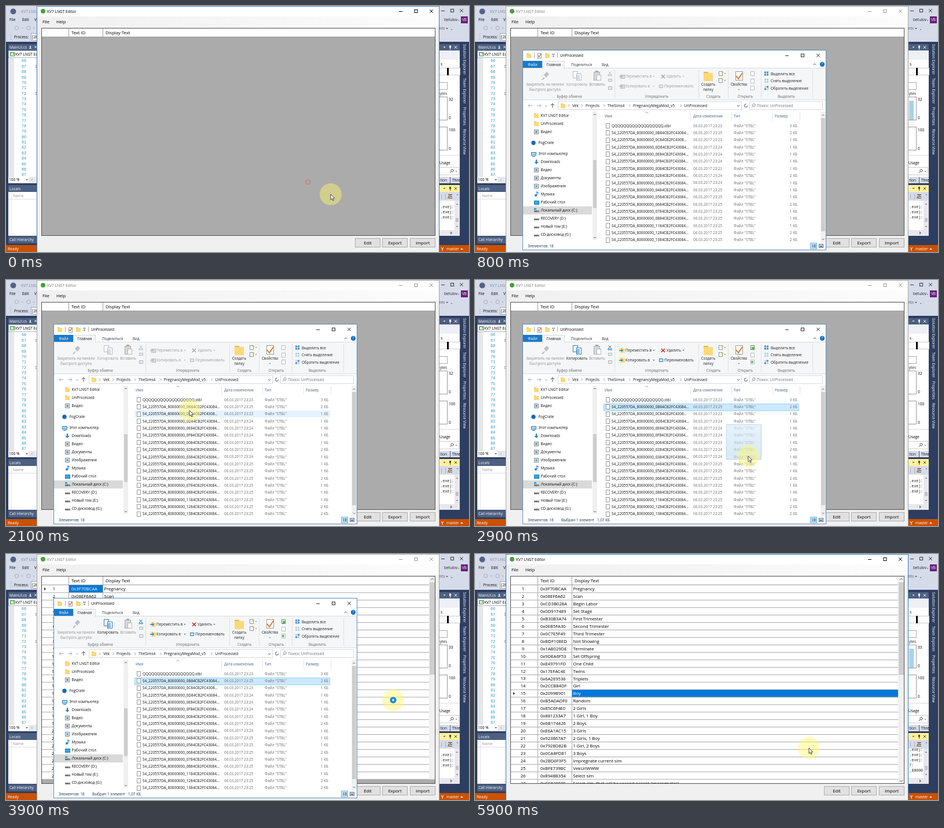
Recreate the animation shown at these times as an HTML page with a canvas. Size 800x426 px, loop 6000 ms.

```html
<!DOCTYPE html>
<html lang="ru">
<head>
<meta charset="utf-8">
<title>Table editor</title>
<style>
html, body { margin: 0; width: 100%; height: 100%; overflow: hidden; }
canvas { display: block; width: 100vw; height: 100vh; }
</style>
</head>
<body>
<canvas id="stage" width="800" height="426"></canvas>
<script>
const ctx = document.getElementById('stage').getContext('2d');
const LOOP = 6000, STEP = 100;
const APP = 'KV7 LNGT Editor';
const SANS = '"Open Sans", "Noto Sans", sans-serif', MONO = '"Liberation Mono", monospace';
const NAVY = '#2d3e60', PANEL = '#4d6082', PALE = '#d6dbe9', BLUE = '#0078d7', GRAY = '#6d6d6d';

// Moments of hard changes, ms
const OPEN = 700, SELECT = 2600, DRAG = 2700, DROP = 3400, LOADED = 3600, READY = 4200, FRONT = 4300, PICK = 4500;

// time, x, y
const PATH = [
  [0, 561, 326], [300, 520, 370], [500, 400, 450], [800, 300, 450], [900, 302, 400],
  [1400, 335, 231], [1700, 321, 230], [1900, 317, 226], [2100, 317, 226], [2400, 312, 221],
  [2600, 312, 222], [2900, 472, 305], [3300, 669, 253], [4300, 669, 253], [4500, 669, 245],
  [4700, 669, 245], [5300, 509, 310], [5900, 577, 336], [6000, 561, 326]
];
// start, end, x, y, radius
const RINGS = [[0, 100, 522, 305, 4], [2500, 2900, 312, 222, 8], [4300, 4900, 669, 253, 10], [4500, 4900, 669, 245, 10]];

const ENTRIES = `3F70BCAA Pregnancy|08EF6A62 Scan|CD3B028A Begin Labor|0D917489 Set Stage|B30B3A74 First Trimester
0EB5FA30 Second Trimester|0C7E5F49 Third Trimester|BDF108ED Not Showing|1AB029DE Terminate|9DEA6F53 Set Offspring
E49791FD One Child|17EFAC4E Twins|6A2E9536 Triplets|2CCB84DF Girl|2099B901 Boy|B5ADADF0 Random|85C6F4E0 2 Girls
881233A7 1 Girl, 1 Boy|6B174426 2 Boys|E6A1AC15 3 Girls|923867A7 2 Girls, 1 Boy|7928D82B 1 Girl, 2 Boys
0CA8FD81 3 Boys|2BD0F3F5 Impregnate current sim|BFE739BC VekUrlWWW|8948B354 Select sim
CC620F8F Select sim, that will be second parent (impregnator)`.split(/[|\n]/);
const FILES = ' 0B 0C 0D 0E 0F 00 02 03 04 05 06 07 08 11 12 13'.split(' ');
const MINUTES = '35344434455555555', SIZES = '32111112111211122';

function rect(x, y, w, h, color) { ctx.fillStyle = color; ctx.fillRect(x, y, w, h); }
function box(x, y, w, h, fill, stroke) {
  if (fill) rect(x, y, w, h, fill);
  ctx.strokeStyle = stroke; ctx.lineWidth = 1;
  ctx.strokeRect(x + .5, y + .5, w - 1, h - 1);
}
function path(points, color, width = 1) {
  ctx.beginPath();
  points.forEach((p, i) => i ? ctx.lineTo(...p) : ctx.moveTo(...p));
  if (width) { ctx.strokeStyle = color; ctx.lineWidth = width; ctx.stroke(); }
  else { ctx.closePath(); ctx.fillStyle = color; ctx.fill(); }
}
function disc(x, y, r, fill, stroke, width = 1) {
  ctx.beginPath(); ctx.arc(x, y, r, 0, 7);
  if (fill) { ctx.fillStyle = fill; ctx.fill(); }
  if (stroke) { ctx.strokeStyle = stroke; ctx.lineWidth = width; ctx.stroke(); }
}
// y is the middle of the capitals
function text(s, x, y, size = 6.5, color = '#000', align = 'left', family = SANS) {
  ctx.font = `${size}px ${family}`;
  ctx.fillStyle = color; ctx.textAlign = align;
  ctx.fillText(s, x, y + size * .36);
}
function clipped(x, y, w, h, paint) {
  ctx.save(); ctx.beginPath(); ctx.rect(x, y, w, h); ctx.clip(); paint(); ctx.restore();
}
const caret = (x, y, color = '#444', r = 2, up = 1) => path([[x - r, y - up * r / 2], [x + r, y - up * r / 2], [x, y + up * r / 2]], color, 0);
const chevron = (x, y, color, r = 2, up = 1) => path([[x - r, y + up * r / 2], [x, y - up * r / 2], [x + r, y + up * r / 2]], color);
const arrowRight = (x, y, color = '#777') => path([[x - 1, y - 2], [x + 1, y], [x - 1, y + 2]], color, .8);
function cross(x, y, r, color, width = 1) {
  path([[x - r, y - r], [x + r, y + r]], color, width);
  path([[x - r, y + r], [x + r, y - r]], color, width);
}
function windowButtons(x, y, gap, color) {
  path([[x - 3, y + .5], [x + 3, y + .5]], color);
  box(x + gap - 3, y - 3, 6, 6, null, color);
  cross(x + 2 * gap, y, 2.8, color);
}
function lens(x, y, color = '#555') {
  disc(x + 1, y - 1, 2.2, null, color);
  path([[x - .5, y + .5], [x - 3, y + 3]], color);
}
function folder(x, y, s = 1) {
  rect(x - 4 * s, y - 4 * s, 4 * s, 2 * s, '#e8b84a');
  rect(x - 4 * s, y - 3 * s, 8 * s, 7 * s, '#fbd977');
}
function page(x, y, w = 7, h = 9, stroke = '#9a9a9a') { box(Math.round(x - w / 2), Math.round(y - h / 2), w, h, '#fff', stroke); }
function panelButtons(y, color) {
  caret(757.5, y, color);
  rect(766, y - 3, 3, 4, color); rect(767, y + 1, 1, 3, color);
  cross(777, y, 2.2, color);
}

function ideLeft() {
  rect(0, 0, 54, 62, PALE);
  disc(12.5, 9.5, 5, '#56618a');
  text(APP, 26, 10, 6.6, '#8088a0');
  text('File', 6, 24); text('Edit', 28, 24); text('View', 49, 24);
  disc(18.5, 38, 3.2, null, '#a5adbf'); disc(39, 38, 3.2, null, '#a5adbf');
  caret(28, 38.5, '#999', 1.5); caret(48, 38.5, '#999', 1.5);
  for (let y = 48; y < 60; y += 3) rect(8, y, 1, 1, '#8993ab');
  text('Process:', 14, 53.5);
  box(43, 47, 30, 13, '#fff', '#9ba7bf'); text('[28', 45, 53.5);

  rect(4, 66, 50, 11, PANEL);
  text('MainUI.cs', 6, 72, 6.6, '#fff');
  rect(41, 69, 2, 4, PALE); rect(40, 73, 4, 1, PALE); cross(51, 71, 2, PALE);
  box(4, 77, 60, 13, '#fff', '#a9b3c7');
  box(7, 80, 8, 7, '#fff', '#388a34'); text('C#', 8, 83.5, 5, '#388a34');
  text(APP, 16, 84);
  rect(4, 90, 50, 206, '#fff'); rect(4, 90, 10, 206, '#e6e7e8');
  for (let n = 66; n < 88; n++) text(n, 35, 95 + (n - 66) * 9.38, 6.6, '#2b91af', 'right', MONO);
  box(51, 102, 5, 5, '#fff', '#a5a5a5'); box(51, 149, 5, 5, '#fff', '#a5a5a5');
  rect(4, 296, 50, 11, '#e8e8ec');
  rect(4, 296, 35, 10, '#fff'); text('100 %', 5, 301, 6.6); caret(36, 301);
  path([[46, 299], [44, 301], [46, 303]], '#aaa');

  rect(4, 310, 50, 12, PANEL); text('Locals', 6, 316.5, 6.6, '#fff');
  rect(4, 322, 50, 76, '#fff'); rect(4, 334, 50, 1, '#dde');
  rect(9, 323, 1, 75, '#e4e6ee'); text('Name', 12, 328.5, 6.6, '#999');
  rect(4, 399, 50, 12, PANEL); text('Call Hierarchy', 6, 405, 6.5, '#fff');
}

function graphFill(t) {
  if (t >= FRONT) return 9 * (t - FRONT) / (LOOP - FRONT);
  return t >= OPEN && t < 1500 ? 8 : 0;
}

function ideRight(t) {
  rect(749, 0, 51, 62, PALE);
  windowButtons(755, 8, 16, '#333');
  text('betulov', 780, 24, 6.6, '#1e1e1e', 'right'); caret(782, 25, '#555', 1.5);
  rect(786, 18, 12, 12, '#68217a'); text('VB', 792, 24, 6.4, '#fff', 'center');
  text('nts', 758, 38.5, 6.5, '#555', 'right'); caret(762, 39); caret(770, 41, '#555', 1.5);

  [['Solution Explorer', 66], ['Team Explorer', 125], ['Properties', 175], ['Resource View', 213]].forEach(([s, y]) => {
    ctx.save(); ctx.translate(792, y); ctx.rotate(Math.PI / 2); text(s, 0, 0, 6.6, '#fff'); ctx.restore();
  });
  rect(749, 66, 35, 11, PANEL); panelButtons(71.5, '#fff');
  rect(749, 77, 35, 219, '#fff'); rect(749, 77, 35, 16, '#eef0f6');
  text('s', 751, 101);
  box(740, 107, 45, 13, '#fff', '#ccc'); rect(762, 107, 3, 13, '#000');
  box(740, 132, 23, 13, '#fff', '#aaa');
  text('Bytes', 762, 152, 6.5, '#222', 'right');
  [157, 209].forEach(y => box(740, y, 23, 41, '#fff', '#999'));
  rect(750, 164, graphFill(t), 33, '#a9d2ea');
  text(t < LOADED ? 32 : 33, 765, 162); text(0, 765, 194);
  text(100, 765, 215); text(0, 765, 246.5);
  rect(749, 258, 35, 1, '#ddd');
  text('Usage', 749, 272);
  box(740, 279, 43, 14, '#fff', '#ccc'); lens(770, 286); caret(778, 286.5, '#555', 1.5);
  rect(749, 296, 35, 11, PALE); rect(767, 296, 1, 11, PANEL);
  text('tion', 762, 301.5, 6.5, '#222', 'right'); text('Thre', 771, 301.5);

  rect(749, 310, 35, 12, '#fff29d'); panelButtons(316, '#5b4f1a');
  rect(749, 322, 35, 15, PALE); rect(752, 326, 1, 8, '#aab'); rect(759, 325, 1, 10, '#aab');
  [326, 329, 332].forEach(y => rect(764, y, 7, 1, '#333'));
  path([[763, 333], [768, 327]], '#c68a1a', 1.5); caret(780, 327, '#555', 1.5);
  rect(749, 337, 35, 61, '#fff');
  const shift = t < FRONT ? 0 : -9;
  clipped(749, 337, 26, 51, () => {
    [348, 357, 366].forEach(y => text('.exe):', 774, y + shift, 6.5, '#222', 'right', MONO));
    if (shift) { text('7:', 750, 366, 6.5, '#222', 'left', MONO); text('_80000', 774, 375, 6.5, '#222', 'right', MONO); }
  });
  rect(775, 337, 9, 61, '#e8e8ec'); rect(749, 388, 35, 10, '#e8e8ec');
  caret(779.5, 343, '#777', 2, -1); caret(779.5, 382, '#777'); rect(777, 367, 5, 7, '#c2c3c9');
  path([[768, 390], [771, 393], [768, 396]], '#777', 0);
}

function ide(t) {
  rect(0, 0, 800, 426, NAVY);
  ideLeft(); ideRight(t);
  rect(0, 414, 800, 12, '#ca5100');
  text('Ready', 3, 420.5, 6.6, '#fff');
  path([[752, 418], [754, 421], [756, 418]], '#fff'); path([[754, 421], [754, 424]], '#fff');
  text('master', 761, 420.5, 6.6, '#fff'); caret(787.5, 420.5, '#fff', 2.5, -1);
}

function tableRows(t) {
  const pitch = 12.93, chosen = t < PICK ? 0 : 14;
  // The last, partly visible row is painted only once loading is over
  const rows = t < FRONT ? ENTRIES.slice(0, -1) : ENTRIES;
  const bottom = Math.min(398, 54 + rows.length * pitch);
  rect(62, 53, 669, bottom - 53, '#fff');
  rows.forEach((entry, i) => {
    const y = 54 + i * pitch, mid = y + 6.6, picked = i === chosen;
    const [, id, label] = entry.match(/(\S+) (.*)/);
    if (picked) {
      rect(chosen ? 167 : 109, y, chosen ? 564 : 58, pitch, BLUE);
      path([[66, mid - 2.5], [69, mid], [66, mid + 2.5]], '#222', 0);
    }
    rect(62, y + pitch - .5, 669, 1, '#a8a8a8');
    text(i + 1, 83, mid, 7.6, '#000', 'center');
    text('0x' + id, 113, mid, 7.65, picked && !chosen ? '#fff' : '#000');
    text(label, 169.5, mid, 7.65, picked && chosen ? '#fff' : '#000');
  });
  [108, 167].forEach(x => rect(x, 53, 1, bottom - 53, '#a8a8a8'));
  rect(731, 39, 11, bottom - 39, '#f0f0f0'); rect(732, 49, 9, 160, '#cdcdcd');
  chevron(736.5, 43.5, '#555', 2.5);
  if (t >= FRONT) chevron(736.5, 393, '#555', 2.5, -1);
}

function editor(t) {
  const active = t < 600 || t >= FRONT, ink = active ? '#000' : '#999';
  rect(53, 0, 696, 426, '#f0f0f0');
  rect(54, 0, 694, 18, '#fff');
  const strip = ctx.createLinearGradient(54, 0, 748, 0);
  strip.addColorStop(0, '#f0f0f0'); strip.addColorStop(1, '#fcfcfc');
  rect(54, 18, 694, 18, strip);
  const edge = active ? '#3c7fb8' : '#a5a5a5';
  rect(53, 0, 696, 1, edge); rect(53, 0, 1, 426, edge); rect(748, 0, 1, 426, edge);
  disc(64, 9, 4, '#4aa03a');
  text(APP, 71, 9.5, 6.6, active ? '#000' : '#777');
  windowButtons(682, 9, 26.5, ink);
  text('File', 63, 27.5, 7.6); text('Help', 87, 27.5, 7.6);
  rect(61, 38, 681, 360, '#ababab');
  clipped(61, 38, 681, 360, () => {
    if (t >= LOADED) tableRows(t);
    rect(62, 39, t < LOADED ? 680 : 669, 14, '#fff');
    rect(62, 53, t < LOADED ? 680 : 669, 1, '#a0a0a0');
    [108, 167].forEach(x => rect(x, 39, 1, 15, '#a0a0a0'));
    text('Text ID', 113, 46.5, 7.65); text('Display Text', 172, 46.5, 7.65);
  });
  box(61, 38, 681, 360, null, '#555');
  [['Edit', 603], ['Export', 650], ['Import', 698]].forEach(([s, x]) => {
    box(x, 402, 44, 16, '#e1e1e1', '#adadad');
    text(s, x + 22, 410.5, 7.6, '#000', 'center');
  });
}

function ribbon(t) {
  const on = t >= SELECT, ink = on ? '#222' : '#9b9b9b', off = '#8d8d8d', blue = on ? '#2f7fc4' : '#b4bcc6';
  const label = (s, x, y, color = '#222', align = 'center') => text(s, x, y, 6.25, color, align);
  rect(83, 94, 523, 14, '#fff');
  rect(83, 95, 33, 13, '#1979ca'); text('Файл', 99.5, 101.5, 6.5, '#fff', 'center');
  rect(83, 108, 523, 55, '#f5f6f7'); rect(83, 107, 523, 1, '#dadbdc'); rect(83, 162, 523, 1, '#dadbdc');
  box(116, 95, 39, 14, '#f5f6f7', '#dadbdc'); rect(117, 107, 37, 2, '#f5f6f7');
  text('Главная', 136, 101.5, 6.3, '#222', 'center');
  text('Поделиться', 166, 101.5, 6.3, '#333'); text('Вид', 219, 101.5, 6.3, '#333');
  chevron(587, 101, '#555', 2.5); disc(600, 101, 4.2, '#1671c0'); text('?', 600, 101, 6.2, '#fff', 'center');
  [241, 386, 437, 494, 583].forEach(x => rect(x, 111, 1, 48, '#dfe0e2'));
  [['Буфер обмена', 163], ['Упорядочить', 314], ['Создать', 412], ['Открыть', 467], ['Выделить', 538]]
    .forEach(([s, x]) => label(s, x, 156.5, '#666'));

  path([[116, 128], [120, 124]], '#aaa', 1.5);
  path([[119, 119], [124, 114], [128, 118], [123, 124]], '#bcbfc4', 0);
  label('Закрепить на панели', 121, 135.5, off); label('быстрого доступа', 121, 145, off);
  page(173, 119, 9, 12, blue); page(179, 123, 9, 12, blue);
  [120, 122, 124, 126].forEach(y => rect(176, y, 5, 1, blue));
  label('Копировать', 176, 135.5, ink);
  box(205, 114, 11, 15, '#d8d8d8', '#aaa'); rect(208, 112, 5, 3, '#aaa'); page(214, 124, 8, 10, '#b5b5b5');
  label('Вставить', 211, 135.5, off);
  cross(233, 116, 2.5, blue); disc(231, 120, 1.3, null, blue); disc(235, 120, 1.3, null, blue);
  box(230, 126, 7, 5, '#e5e8ec', '#b5bac2'); box(230, 139, 7, 6, '#e9e9e9', '#b5b5b5');

  [['Переместить в', 122], ['Копировать в', 139]].forEach(([s, y]) => {
    if (on) folder(255, y); else box(251, y - 3, 8, 7, '#ddd', '#bbb');
    path([[249, y], [254, y]], blue, 1.6); path([[253, y - 2.5], [256, y], [253, y + 2.5]], blue, 0);
    label(s, 260, y, ink, 'left'); caret(309, y, ink, 1.5);
  });
  cross(325, 122, 3, on ? '#d3312c' : '#aaa', 1.7); label('Удалить', 331, 122, ink, 'left'); caret(360, 122, ink, 1.5);
  box(318, 136, 7, 6, on ? '#cfe4f7' : '#e5e5e5', blue); text('Переименовать', 327, 139, 6.5, ink);

  folder(403, 122, 2); label('Создать', 403, 135.5); label('папку', 403, 145);
  [117, 129].forEach(y => { page(424, y, 7, 8, '#7d98b8'); rect(426, y - 3, 3, 3, '#efc54f'); caret(432, y, '#555', 1.3); });
  page(456, 121, 13, 16); path([[451, 121], [455, 126], [462, 116]], '#e07b2a', 2);
  label('Свойства', 456, 135.5); caret(456, 145, '#555', 1.5);
  [117, 130, 142].forEach((y, i) => page(479, y, 7, 8, on && i === 0 ? '#4a9a48' : '#b4bcc6'));
  if (on) { rect(478, 116, 4, 4, '#5fb454'); disc(479, 142, 2, '#5fb454'); }
  ['Выделить все', 'Снять выделение', 'Обратить выделение'].forEach((s, i) => {
    const y = 117.5 + i * 12.5;
    for (let k = 0; k < 4; k++)
      rect(500 + k % 2 * 4, y - 4 + (k >> 1) * 4, 3, 3, i === 0 || i === 2 && k % 3 ? '#3d8dd6' : '#b9cfe4');
    label(s, 511, y, '#222', 'left');
  });
}

function addressBar() {
  rect(83, 163, 523, 20, '#fff');
  path([[99, 172.5], [92, 172.5]], '#aaa'); path([[95, 169.5], [92, 172.5], [95, 175.5]], '#aaa');
  path([[107, 172.5], [114, 172.5]], '#aaa'); path([[111, 169.5], [114, 172.5], [111, 175.5]], '#aaa');
  chevron(123, 173, '#888', 1.5, -1);
  path([[134, 176], [134, 169]], '#444'); path([[131, 172], [134, 169], [137, 172]], '#444');
  box(143, 165, 318, 15, '#fff', '#d9d9d9'); folder(152, 173);
  [['Vek', 168], ['Projects', 191], ['TheSims4', 229], ['PregnancyMegaMod_v5', 273], ['UnProcessed', 361.5]]
    .forEach(([s, x]) => { arrowRight(x - 6, 172.5); text(s, x, 172.5, 6.5, '#111'); });
  chevron(455, 173, '#555', 2, -1);
  ctx.beginPath(); ctx.arc(468, 172.5, 2.7, 0, 5); ctx.strokeStyle = '#555'; ctx.stroke();
  box(474, 165, 127, 15, '#fff', '#d9d9d9'); lens(481, 172.5, '#888');
  text('Поиск: UnProcessed', 487, 172.5, 6.5, GRAY);
}

function navPane() {
  const tree = [[APP, 190], ['UnProcessed', 204], ['Видео', 218], ['FogCrate', 237], ['Этот компьютер', 256]];
  ['Downloads', 'Видео', 'Документы', 'Изображения', 'Музыка', 'Рабочий стол', 'Локальный диск (C:)', 'RECOVERY (D:)', 'Новый том (E:)', 'CD-дисковод (G:)']
    .forEach((s, i) => tree.push([s, 270 + 14 * i]));
  rect(83, 347, 119, 14, '#d9d9d9');
  tree.forEach(([s, y], i) => {
    const root = i === 3 || i === 4, x = root ? 101 : 106;
    if (i < 2) folder(x, y);
    else if (i === 3) disc(x, y, 3.7, '#1269b5');
    else if (i === 4) { box(x - 4, y - 3, 9, 6, '#9fd5f2', '#3787b5'); rect(x - 2, y + 4, 5, 1, '#456'); }
    else if (i === 5) { path([[x, y - 4], [x, y + 2]], '#2383d0', 2); path([[x - 3.5, y], [x, y + 4], [x + 3.5, y]], '#2383d0', 0); }
    else if (i === 9) { path([[x + 1, y + 2], [x + 1, y - 4], [x + 4, y - 2]], '#1785ce', 1.3); disc(x - 1, y + 2, 2, '#1785ce'); }
    else if (i === 10) box(x - 4, y - 3, 9, 7, '#33a7e8', '#1473b5');
    else if (i > 10) { rect(x - 4, y, 9, 3, '#777'); rect(x + 2, y + 1, 2, 1, '#6ee07c'); if (i === 11) rect(x - 4, y - 4, 4, 3, '#20a6e8'); }
    else { page(x, y, 8, 8, '#77848f'); rect(x - 2, y - 2, 4, 4, i === 8 ? '#62b5df' : '#8a97a5'); }
    text(s, root ? 109.5 : 113.5, y, 6.45, '#111');
  });
  rect(203, 183, 8, 222, '#f0f0f0'); rect(204, 267, 6, 83, '#cdcdcd');
  chevron(207, 188, '#666', 2); chevron(207, 401, '#666', 2, -1);
}

function fileList(t) {
  const ink = '#4c607a', pitch = 12.35;
  text('Имя', 224, 191, 6.4, ink); text('Дата изменения', 377, 191, 6.4, ink);
  text('Тип', 447, 191, 6.4, ink); text('Размер', 518, 191, 6.4, ink);
  chevron(297, 184.5, '#888', 2);
  [372, 443, 514, 561].forEach(x => rect(x, 184, 1, 15, '#e5e5e5'));
  const hover = t >= 1400 && t < 2300 ? 2 : t >= 2300 && t < SELECT ? 1 : -1;
  clipped(212, 199, 386, 211, () => FILES.forEach((code, i) => {
    const y = 207.4 + i * pitch, top = Math.round(y - 6);
    if (t >= SELECT && i === 1) box(222, top, 338, 13, '#cce8ff', '#99d1ff');
    else if (i === hover) rect(222, top, 338, 12, '#e5f3ff');
    page(229, y, 7, 9);
    const name = i ? `S4_220557DA_80000000_${code}84CB2FC4308${i === 2 ? '' : 4}...` : 'Q'.repeat(18) + '.stbl';
    text(name, 236, y, 6.42, '#111');
    text('06.03.2017 23:2' + MINUTES[i], 377, y, 6.35, GRAY);
    text('Файл "STBL"', 447, y, 6.5, GRAY);
    text(SIZES[i] + ' КБ', 557, y, 6.4, GRAY, 'right');
  }));
  rect(597, 183, 9, 226, '#f0f0f0'); rect(598, 194, 7, 196, '#cdcdcd');
  chevron(601.5, 189, '#666', 2); chevron(601.5, 404, '#666', 2, -1);
}

function explorer(t) {
  rect(82, 76, 525, 347, '#fff');
  folder(93, 86); rect(102, 81, 1, 9, '#aaa');
  page(111, 86, 7, 9); path([[109, 86], [111, 88], [114, 83]], '#d85a3a', 1.2);
  folder(125, 86); rect(133, 83, 5, 1, '#555'); caret(135.5, 87, '#555'); rect(142, 81, 1, 9, '#aaa');
  text('UnProcessed', 147, 86, 6.55);
  windowButtons(539, 85.5, 27, '#222');
  ribbon(t); addressBar(); navPane(); fileList(t);
  text('Элементов: 18', 91, 416, 6.4, '#234');
  if (t >= SELECT) { text('Выбран 1 элемент', 149, 416, 6.4, '#234'); text('1,07 КБ', 211, 416, 6.4, '#234'); }
  box(579, 410, 12, 11, '#cce8ff', '#66b2e8');
  for (let y = 413; y < 419; y += 2) { rect(582, y, 2, 1, '#456'); rect(585, y, 4, 1, '#456'); }
  box(594, 412, 8, 7, '#d5e5f2', '#667'); rect(596, 415, 4, 2, '#468');
  box(82, 76, 525, 347, null, '#5c8db8');
}

function cursorAt(t) {
  const i = PATH.findIndex(p => p[0] > t), [t0, x0, y0] = PATH[i - 1], [t1, x1, y1] = PATH[i];
  const k = (t - t0) / (t1 - t0);
  return [x0 + (x1 - x0) * k, y0 + (y1 - y0) * k];
}

function pointer(t) {
  const [x, y] = cursorAt(t);
  if (t >= DRAG && t < DROP) {
    const ghost = ctx.createLinearGradient(0, y - 55, 0, y + 6);
    ghost.addColorStop(0, 'rgba(222,239,250,.7)'); ghost.addColorStop(1, 'rgba(190,220,240,.6)');
    box(Math.round(x - 38), Math.round(y - 55), 61, 61, ghost, 'rgba(150,190,220,.5)');
  }
  disc(x, y, 19, 'rgba(255,246,105,.46)');
  RINGS.forEach(([start, end, rx, ry, r]) => {
    if (t >= start && t < end) disc(rx, ry, r, null, 'rgba(225,75,50,.75)', .9);
  });
  if (t >= DROP && t < READY) {
    disc(x, y, 3.7, '#fff', '#1d8ad8', 3.8);
    return;
  }
  const shape = [[0, 0], [0, 9.5], [2.2, 7.5], [3.8, 11], [5.3, 10.3], [3.8, 7], [6.8, 6.8], [0, 0]].map(([a, b]) => [x + a, y + b]);
  path(shape, '#fff', 0); path(shape, '#222', .8);
}

function draw(t) {
  ide(t);
  editor(t);
  if (t >= OPEN && t < FRONT) {
    ctx.globalAlpha = t < OPEN + STEP ? .6 : 1;
    explorer(t);
    ctx.globalAlpha = 1;
  }
  pointer(t);
}

const began = performance.now();
function tick() {
  const t = (performance.now() - began) % LOOP;
  draw(Math.floor(t / STEP) * STEP);
  requestAnimationFrame(tick);
}
tick();
</script>
</body>
</html>
```
